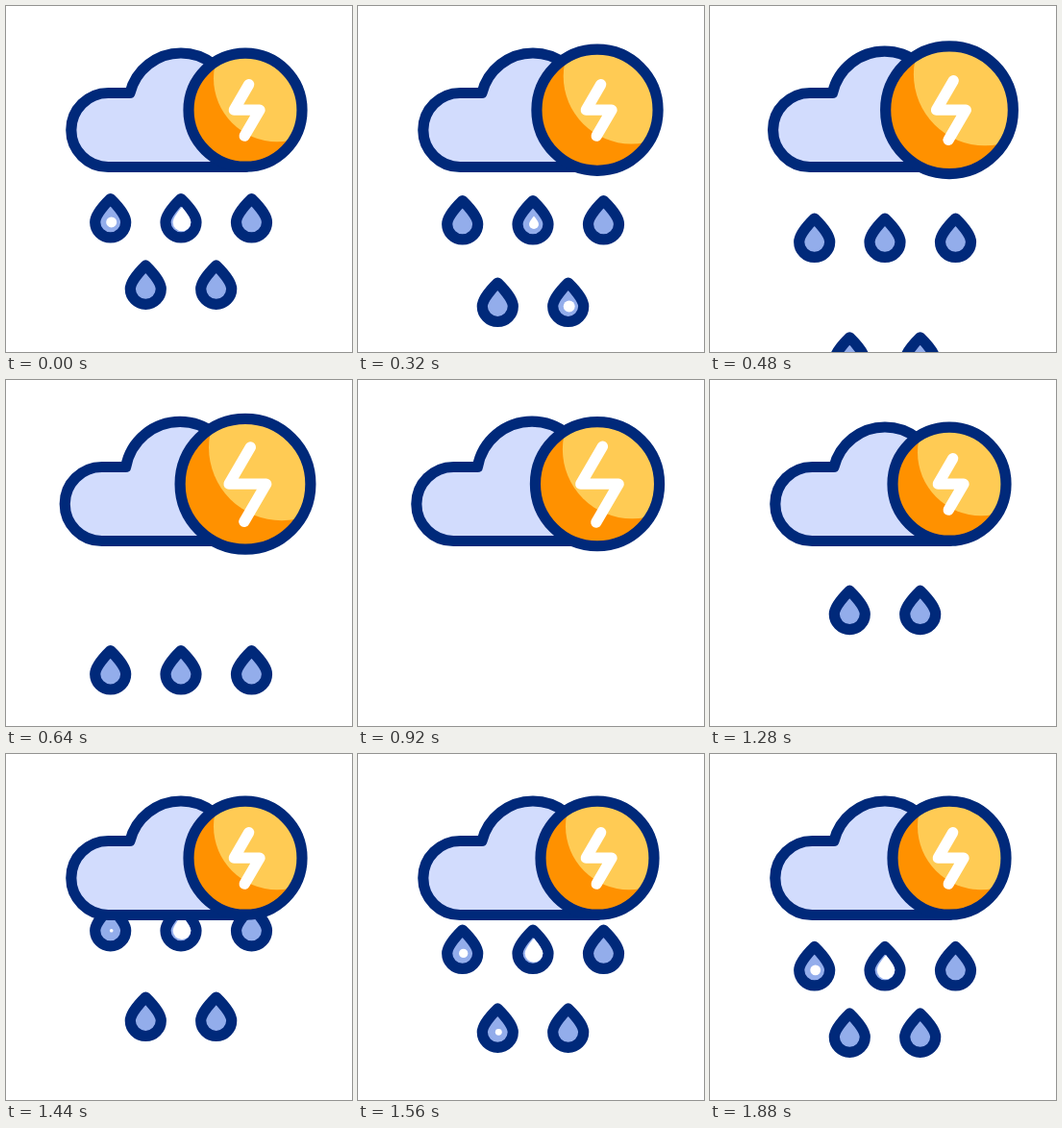
Animation, 360 px wide and 360 px high, one loop 1920 ms. Source, as an HTML page:

```html
<!DOCTYPE html>
<html lang="en">
<head>
<meta charset="utf-8">
<title>Thunderstorm</title>
<style>
  html, body { margin: 0; width: 100%; height: 100%; overflow: hidden; background: #fff; }
  svg { display: block; width: 100vw; height: 100vh; }
  .line { stroke: #00297a; stroke-width: 11.2; stroke-linejoin: round; }
  .line, #bolt { vector-effect: non-scaling-stroke; }
</style>
</head>
<body>
<svg viewBox="0 0 360 360">
  <defs>
    <clipPath id="disc"><circle r="59"/></clipPath>
  </defs>
  <g id="rain"></g>
  <path id="cloud" class="line" fill="#d2dcfd"/>
  <g id="sun">
    <circle r="59" fill="#ff9100"/>
    <circle cx="33" cy="-33" r="66" fill="#ffcb54" clip-path="url(#disc)"/>
    <circle r="59" class="line" fill="none"/>
  </g>
  <path id="bolt" d="M3.7-26.5L-11.7 0H15L-1-.2L15 0L-.8 27" fill="none" stroke="#fff"
        stroke-width="11.3" stroke-linecap="round" stroke-linejoin="round"/>
</svg>
<script>
const LOOP = 1920;
const DROP = 'M0 5.6C-4 9.5-16 22-16 30A16 16 0 0 0 16 30C16 22 4 9.5 0 5.6Z';
const GLINT = 'M0-1.7Q-1-.5-1 0A1 1 0 0 0 1 0Q1-.5 0-1.7Z';
const $ = id => document.getElementById(id);

$('bolt').setAttribute('d', 'M3.7-26.5L-11.7 0H15L-.8 27');

function add(parent, tag, attrs) {
  const node = document.createElementNS('http://www.w3.org/2000/svg', tag);
  for (const name in attrs) node.setAttribute(name, attrs[name]);
  return parent.appendChild(node);
}

// Smooth rise and fall around a peak time.
function swell(t, peak, half) {
  const d = Math.abs(t - peak) / half;
  return d < 1 ? (1 + Math.cos(Math.PI * d)) / 2 : 0;
}

// Linear interpolation through [time, value] points.
function track(t, points) {
  for (let i = 1; i < points.length; i++) {
    const [a, u] = points[i - 1], [b, v] = points[i];
    if (t <= b) return u + (v - u) * (t - a) / (b - a);
  }
  return points[points.length - 1][1];
}

const upper = { y: 194.9, leave: 149, settle: 1925 };
const lower = { y: 264.3, leave: 0, settle: 1800 };
const drops = [
  { row: upper, x: 108.7, glint: [[0, 5.5], [120, 5], [200, 0], [1400, 0], [1500, 4.5], [1920, 5.5]] },
  { row: upper, x: 182, full: true, glint: [[0, 9.3], [100, 9.3], [320, 5], [480, 0], [1340, 0], [1420, 9.3], [1920, 9.3]] },
  { row: upper, x: 255.5 },
  { row: lower, x: 145.3, glint: [[0, 0], [1440, 0], [1560, 3.5], [1680, 0], [1920, 0]] },
  { row: lower, x: 218.7, glint: [[0, 0], [180, 0], [320, 6], [460, 0], [1920, 0]] }
];

for (const drop of drops) {
  drop.node = add($('rain'), 'g', {});
  add(drop.node, 'path', { d: DROP, class: 'line', fill: '#93adeb' });
  if (drop.glint) {
    drop.shine = add(drop.node, drop.full ? 'path' : 'circle',
      drop.full ? { d: GLINT, fill: '#fff' } : { r: 1, fill: '#fff' });
  }
}

function rowY(row, t) {
  if (t < 960) return row.y + 18 * (Math.max(0, t - row.leave) / 320) ** 3.5;
  return row.y - 51 * (Math.max(0, row.settle - t) / 520) ** 3;
}

function draw(t) {
  const puff = swell(t, 790, 470);
  const shift = 8.5 * puff;
  const left = 106.3 - shift, notch = 129 - 5.6 * puff;
  const half = 53 + 4.4 * puff, rise = 41.5 + 7.2 * puff;
  const r = (half * half + rise * rise) / (2 * rise);
  $('cloud').setAttribute('d',
    `M249 167.5H${left}A38.5 38.5 0 0 1 ${left} 90.5H${notch}A${r} ${r} 0 0 1 ${notch + 2 * half} 90.5Z`);

  const grow = 1 + 8.9 / 59 * swell(t, 655, 635);
  $('sun').setAttribute('transform', `translate(249 108.2) scale(${grow})`);
  $('bolt').setAttribute('transform', `translate(249 108.2) scale(${1 + 0.58 * puff})`);

  for (const { row, x, glint, shine, node } of drops) {
    const y = rowY(row, t);
    const visible = y < 360 && y > 112;
    node.setAttribute('visibility', visible ? 'visible' : 'hidden');
    if (!visible) continue;
    node.setAttribute('transform', `translate(${x} ${y})`);
    if (shine) shine.setAttribute('transform', `translate(1 30) scale(${track(t, glint)})`);
  }
}

const start = performance.now();
function tick() {
  draw((performance.now() - start) % LOOP);
  requestAnimationFrame(tick);
}
tick();
</script>
</body>
</html>
```
